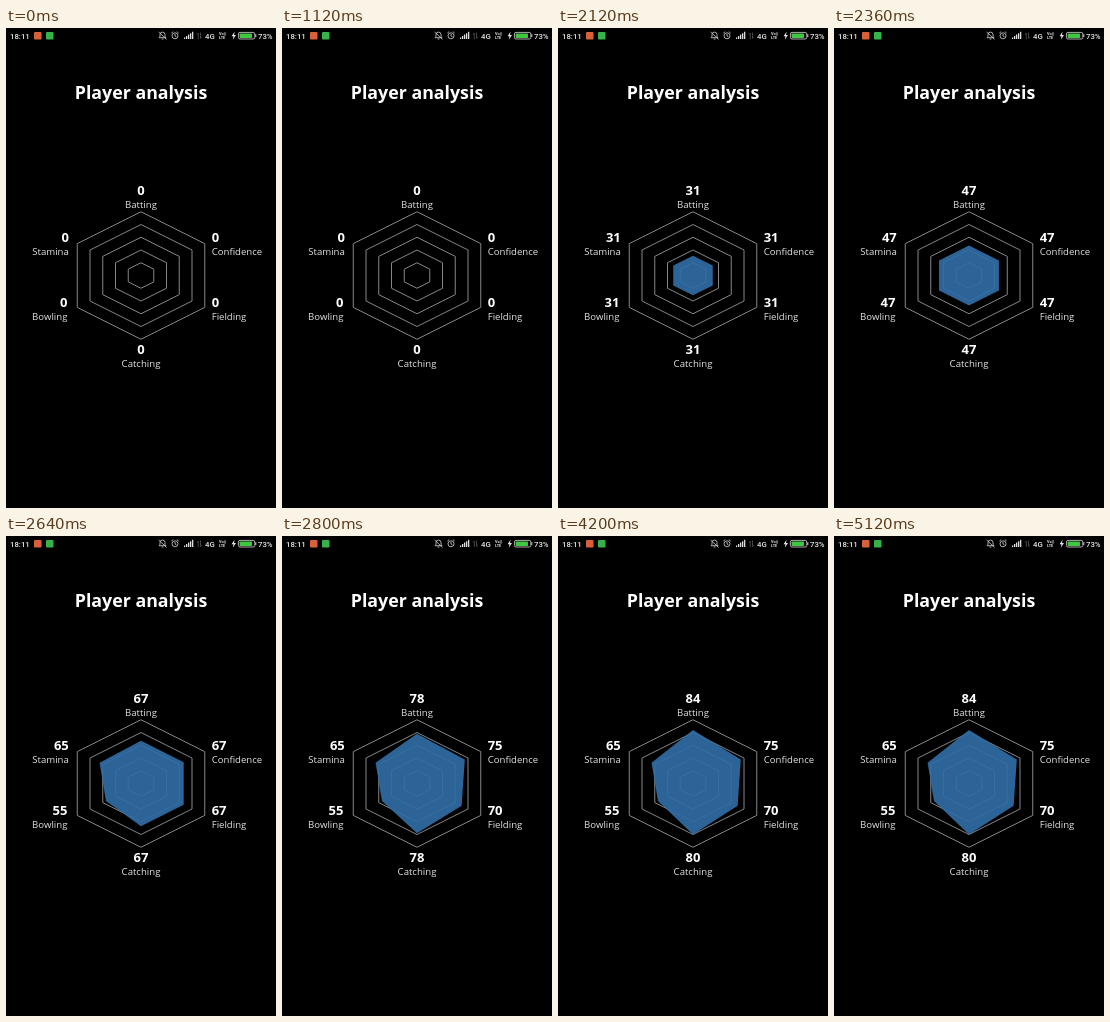
Animation of 270 by 480 pixels, one loop 5.16 s. Source, as an HTML page:

```html
<!DOCTYPE html>
<html lang="en">
<head>
<meta charset="utf-8">
<title>Player analysis</title>
<style>
  html, body { margin: 0; width: 100%; height: 100%; overflow: hidden; background: #000; }
  svg { display: block; width: 270px; height: 480px; }
  text { fill: #fff; font-family: "Open Sans", sans-serif; }
  .title { font-size: 17.8px; font-weight: 700; }
  .value { font-size: 13px; font-weight: 700; }
  .label { font-size: 9.6px; fill: #e2e2e2; }
  .middle { text-anchor: middle; }
  .end { text-anchor: end; }
  .status text { font-family: Roboto, sans-serif; font-weight: 500; font-size: 7.8px; fill: #e4e4e4; }
  .status .tiny { font-size: 3.9px; font-weight: 700; }
  .line { fill: none; stroke: #d8d8d8; stroke-width: .8; }
  .ring { fill: none; stroke: #868686; stroke-width: 1; }
  #shape { fill: #316da4; fill-opacity: .92; }
</style>
</head>
<body>
<svg viewBox="0 0 270 480">
  <g class="status">
    <text x="4" y="10.6">18:11</text>
    <rect x="28" y="4" width="7.5" height="7.5" rx="1" fill="#d8613a"/>
    <rect x="40" y="4" width="7.5" height="7.5" rx="1" fill="#35b34a"/>

    <!-- muted bell -->
    <path class="line" d="M153 9.7h7l-1-1.4V6.6a2.5 2.5 0 0 0-5 0v1.7zM155.6 11h1.8M152.6 4l8 7.4"/>
    <!-- alarm clock -->
    <circle class="line" cx="169" cy="7.8" r="3"/>
    <path class="line" d="M169 6v2l1.4.8M165.4 5l1.8-1.4M172.6 5l-1.8-1.4"/>
    <!-- signal -->
    <path fill="#dedede" d="M178 9.4h1.3V11H178zM180 8h1.3v3H180zM182 6.6h1.3V11H182zM184 5.2h1.3V11H184zM186 3.8h1.3V11H186z"/>
    <!-- data arrows -->
    <path class="line" style="stroke:#555" d="M192.3 11V5l-1.2 1.5M194.5 4.5v6l1.2-1.5"/>
    <text x="199" y="10.6">4G</text>
    <text class="tiny" x="213" y="7">Vo))</text>
    <text class="tiny" x="213" y="11">LTE</text>
    <!-- charging battery -->
    <path fill="#e4e4e4" d="M228.6 3.6l-3 4.6h1.9l-.7 3.6 3.2-4.9h-2z"/>
    <rect class="line" x="232.4" y="4.4" width="16.4" height="6.6" rx="1.6"/>
    <rect x="233.6" y="5.5" width="12.4" height="4.4" rx=".7" fill="#3fc73f"/>
    <path fill="#d8d8d8" d="M249.3 6.3h1v2.8h-1z"/>
    <text x="252" y="10.6">73%</text>
  </g>

  <text class="title middle" x="135" y="71.2">Player analysis</text>
  <g id="rings"></g>
  <polygon id="shape"/>
  <g id="skills"></g>
</svg>
<script>
  const LOOP = 5160, STEP = 40, START = 1660, TICK = 14.6;
  const CX = 135, CY = 247.5, R = 63.75;

  // axis direction, caption anchor and final score
  const skills = [
    { name: "Batting",    score: 84, dx: 0,  dy: -1,  x: 135,   y: 167.4, align: "middle" },
    { name: "Confidence", score: 75, dx: 1,  dy: -.5, x: 205.7, y: 214.4, align: "start" },
    { name: "Fielding",   score: 70, dx: 1,  dy: .5,  x: 205.7, y: 279.4, align: "start" },
    { name: "Catching",   score: 80, dx: 0,  dy: 1,   x: 135,   y: 326.4, align: "middle" },
    { name: "Bowling",    score: 55, dx: -1, dy: .5,  x: 61.4,  y: 279.4, align: "end" },
    { name: "Stamina",    score: 65, dx: -1, dy: -.5, x: 62.8,  y: 214.4, align: "end" }
  ];

  const byId = id => document.getElementById(id);

  function add(parent, tag, attrs, text = "") {
    const el = document.createElementNS("http://www.w3.org/2000/svg", tag);
    for (const key in attrs) el.setAttribute(key, attrs[key]);
    el.textContent = text;
    return parent.appendChild(el);
  }

  // polygon through every axis at the given percentage
  const outline = percent => skills.map(s => {
    const r = R * percent(s) / 100;
    return (CX + s.dx * r).toFixed(2) + "," + (CY + s.dy * r).toFixed(2);
  }).join(" ");

  for (let p = 20; p <= 100; p += 20)
    add(byId("rings"), "polygon", { class: "ring", points: outline(() => p) });

  for (const s of skills) {
    s.value = add(byId("skills"), "text", { class: "value " + s.align, x: s.x, y: s.y }, "0");
    add(byId("skills"), "text", { class: "label " + s.align, x: s.x, y: s.y + 12.6 }, s.name);
  }

  function draw() {
    const t = Math.floor(performance.now() % LOOP / STEP) * STEP;
    const count = Math.max(0, Math.floor((t - START) / TICK));
    const current = s => Math.min(count, s.score);
    for (const s of skills) s.value.textContent = current(s);
    byId("shape").setAttribute("points", outline(current));
    requestAnimationFrame(draw);
  }
  draw();
</script>
</body>
</html>
```
